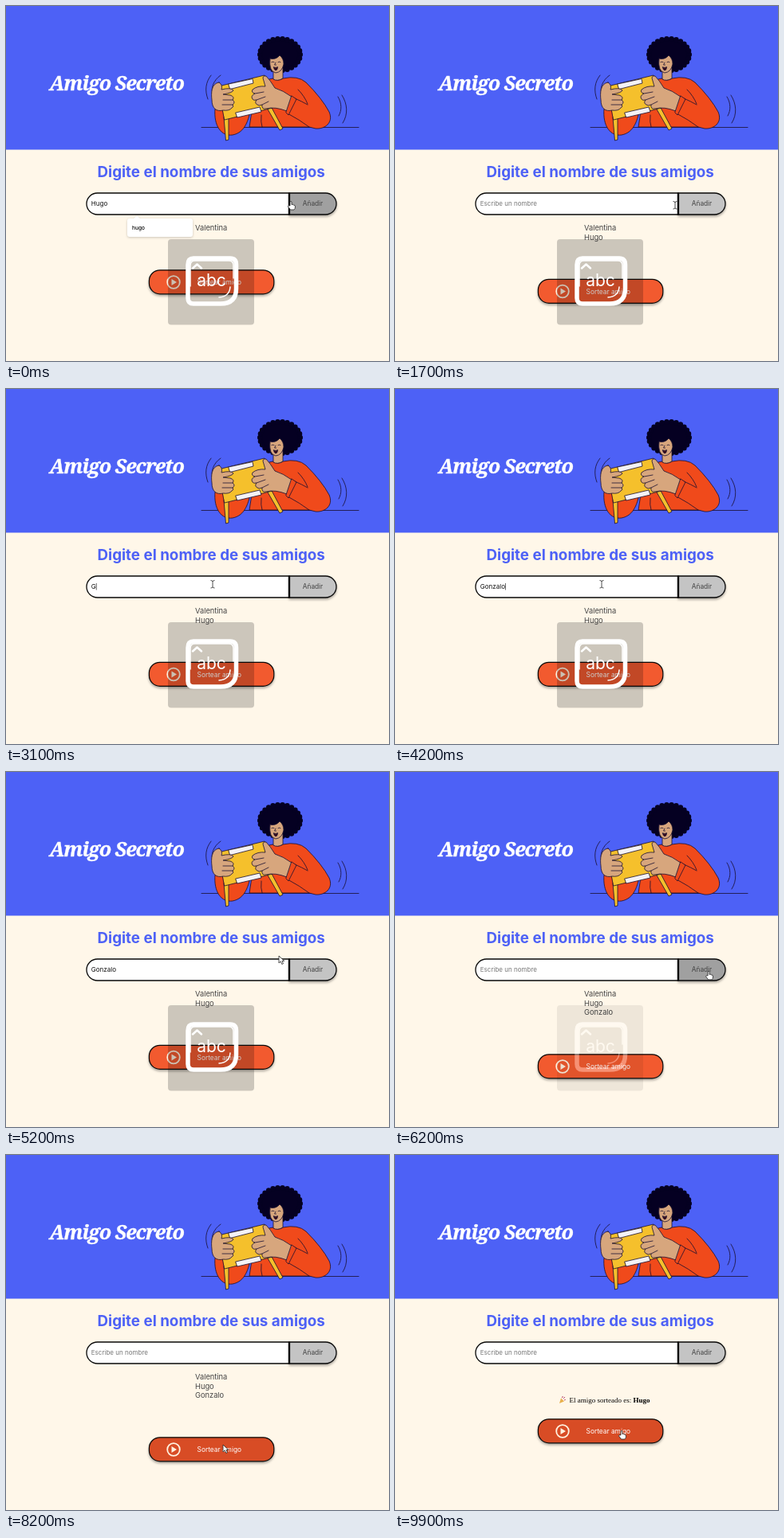
Recreate the animation shown at these times as an HTML page. Size 480 by 446 pixels, loop 10000 ms.

```html
<!DOCTYPE html>
<html lang="es">
<head>
<meta charset="utf-8">
<title>Amigo Secreto</title>
<style>
  html, body { margin: 0; width: 100%; height: 100%; overflow: hidden; background: #fff7e9; }
  svg { display: block; width: 480px; height: 446px; font-family: Inter, sans-serif; }
  .shadow { filter: drop-shadow(.5px 2px 1.5px #0005); }
  .line { fill: none; }
  .art path { stroke: #1a1030; stroke-width: .8; stroke-linejoin: round; stroke-linecap: round; }
  .skin { fill: #d7a67d; }
  .cloth { fill: #f04a1b; }
</style>
</head>
<body>
<svg viewBox="0 0 480 446">
  <rect width="480" height="180.5" fill="#4d61f6"/>
  <text x="54.500" y="106" font-family="Merriweather, 'Noto Serif', serif" font-size="25" font-weight="700" font-style="italic" letter-spacing="-1.050" fill="#fff" stroke="#fff" stroke-width=".4">Amigo Secreto</text>

  <g class="art">
    <path class="line" d="M245 152.5H442M253 117C249 106 250 96 257 87M259 112C256 104 260 93 269 87M417 138C421 131 421 122 416 114M422 147C429 136 428 123 421 112"/>
    <path class="cloth" d="M262 129C260 151 270 164 284 162C300 159 304 143 307 128Z"/>
    <path class="cloth" d="M318 94Q328 93 334 91Q341 95 347 91Q366 87 376 96Q396 116 405 133C411 147 399 155 388 154L380 152H305L309 126Z"/>
    <path class="line" d="M362 116Q371 120 378 124M353 135Q368 143 380 152M366 105Q374 113 378 123M320 137Q319 146 321 152"/>
    <g id="hair" fill="#050022"></g>
    <path class="skin" d="M335 79L335 92Q340 95 347 91L347 78Z"/>
    <path class="skin" d="M331 66Q338 68 343 62Q348 66 348 73Q346 83 338 84Q329 82 331 66Z"/>
    <path class="line" d="M333 70.500q1.500-1 3 0M341 70.500q1.500-1 3 0M338 71l-1.500 3h2"/>
    <path fill="#3a0d1c" d="M335.500 77q3 1 5-.5q0 4-2.500 4.500q-2-.5-2.500-4Z"/>
    <path fill="#f5c02c" d="M273 140L275.500 169L279 168L279 138ZM327 128L343 156L347 154L332 126Z"/>
    <path fill="#f5c02c" d="M266 101L324 87L334 128L274 143Z"/>
    <path fill="#f4f2f5" d="M279 98L309 91.500L310 97L281 104.500ZM288 134L318 127L320 133L290 140Z"/>
    <path class="skin" d="M267 96C257 97 257 110 258 118C258 129 264 133 272 131Q280 132 283 128Q286 127 284 124Q288 121 284 118Q287 114 281 112L272 111Q284 109 285 106Q282 102 270 105Q272 99 267 96Z"/>
    <path class="line" d="M272 118H284M271 124H284"/>
    <path class="skin" d="M358 114Q347 106 337 103Q331 93 326 88Q320 87 323 94L325 101Q315 100 309 105Q307 109 312 110Q306 113 309 117Q310 119 314 118Q311 122 315 124Q317 126 321 124Q320 130 326 129Q337 126 352 132Z"/>
    <path class="line" d="M312 110L323 108M314 118L325 114M321 124L329 120"/>
    <path class="cloth" d="M358 113L364 117L354 137L351 134Z"/>
  </g>

  <text x="257.200" y="214.500" text-anchor="middle" font-size="18.800" font-weight="700" fill="#4d61f6">Digite el nombre de sus amigos</text>

  <g stroke="#080808" stroke-width="1.300">
    <path fill="#fff" d="M355 235H114.500A13.500 13.500 0 0 0 114.500 262H355Z"/>
    <path id="add" class="shadow" d="M355 235H400.500A13.500 13.500 0 0 1 400.500 262H355Z"/>
    <path d="M355 235V262.500" stroke-width="2.300"/>
  </g>
  <text x="384.500" y="251" text-anchor="middle" font-size="8.300" fill="#444">Añadir</text>
  <text id="field" x="106.800" y="251" font-size="8"></text>
  <path id="caret" d="M0 244V252.500" stroke="#222" stroke-width=".7"/>

  <g id="list" font-size="9.300" fill="#444">
    <text x="237" y="282">Valentina</text>
    <text x="237" y="293.500">Hugo</text>
    <text x="237" y="305">Gonzalo</text>
  </g>
  <g id="hint">
    <path class="shadow" style="filter:drop-shadow(0 1px 1.500px #0003)" fill="#fff" d="M155 267H160L164 263.500L168 267H231Q234 267 234 270V287Q234 290 231 290H155Q152 290 152 287V270Q152 267 155 267Z"/>
    <text x="158" y="281" font-size="6.600" font-weight="500">hugo</text>
  </g>
  <g id="result">
    <path d="M206 312L208 305.500L212 309.500Z" fill="#e8b04a"/>
    <path d="M209 305q2-1 1-2M212 308q2-1 2 0M211 306l2-2" fill="none" stroke="#b8496b"/>
    <text x="218.500" y="311" font-family="'Liberation Serif', serif" font-size="9">El amigo sorteado es: <tspan font-weight="700">Hugo</tspan></text>
  </g>

  <g id="draw">
    <rect id="drawBox" class="shadow" x="179.400" y="-.2" width="156.400" height="30" rx="13.500" stroke="#080808" stroke-width="1.200"/>
    <circle cx="210" cy="15" r="7.800" fill="none" stroke="#fff1df" stroke-width="1.800"/>
    <path d="M207.500 11L214 15L207.500 19Z" fill="#fff1df"/>
    <text x="267.300" y="18" text-anchor="middle" font-size="8.350" fill="#fff">Sortear amigo</text>
  </g>

  <g id="keys">
    <rect x="203" y="293" width="108" height="107.500" rx="4" opacity=".2"/>
    <g fill="none" stroke="#fff" stroke-linecap="round" stroke-linejoin="round">
      <path stroke-width="5.500" d="M235 317H281Q288.500 317 288.500 325V355Q288.500 374 269 374H235Q228 374 228 367V325Q228 317 235 317Z"/>
      <path stroke-width="1.500" d="M231 352V326Q231 320 237 320H279Q285 320 285 326V342M281 353Q280 365 267 366"/>
      <path stroke-width="2.500" d="M234 329.500L239.500 324.500L245 329.500"/>
    </g>
    <text x="257.500" y="352" text-anchor="middle" font-size="21" fill="#fff">abc</text>
  </g>

  <g id="cursor" stroke="#222" stroke-width=".8" stroke-linejoin="round">
    <path id="arrow" fill="#fff" d="M0 0V9L2.200 7L3.800 10.500L5.500 9.700L4 6.400H6.800Z"/>
    <path id="beam" fill="none" d="M-2.500-4.500Q0-4.500 0-3Q0-4.500 2.500-4.500M0-3V3.500M-2.500 5Q0 5 0 3.500Q0 5 2.500 5"/>
    <path id="hand" fill="#fff" d="M-1-4Q0-5.500 1-4V-.5Q3-1 3.500 0Q5.500 0 5.500 2Q5.500 5 4 6H-.5L-3.500 2Q-3.500 0-1 1Z"/>
  </g>
</svg>
<script>
const LOOP = 10000, NAME = 'Gonzalo';
const ADD_1 = 600, TYPE = 3000, ADD_2 = 6000, DRAWN = 8500;
const el = Object.fromEntries([...document.querySelectorAll('[id]')].map(e => [e.id, e]));
const clamp = v => Math.max(0, Math.min(1, v));
const show = (e, on) => e.style.display = on ? '' : 'none';

// time, x, y of the pointer
const path = [
  [0, 357, 250], [1200, 357, 250], [1700, 351, 250], [1900, 351, 250], [2500, 259, 245],
  [4500, 259, 245], [5200, 342, 231], [5350, 342, 231], [5750, 390, 251], [6400, 394, 256],
  [7100, 394, 256], [7700, 272, 364], [8700, 272, 364], [9200, 284, 351], [LOOP, 284, 351]
];
// time from which each pointer shape is used
const shapes = [[0, 'hand'], [1400, 'beam'], [4700, 'arrow'], [5500, 'hand'], [7200, 'arrow'], [9000, 'hand']];

let curls = '';
for (let i = 0; i < 26; i++) {
  const a = i * Math.PI / 13;
  curls += `<circle cx="${343.5 + 25.3 * Math.cos(a)}" cy="${61 + 20 * Math.sin(a)}" r="3.200"/>`;
}
el.hair.innerHTML = '<ellipse cx="343.5" cy="61" rx="27" ry="21.5"/>' + curls;

function pointer(t) {
  const i = Math.max(1, path.findIndex(p => p[0] > t));
  const [t0, x0, y0] = path[i - 1], [t1, x1, y1] = path[i];
  const k = clamp((t - t0) / (t1 - t0)), s = k * k * (3 - 2 * k);
  return [x0 + (x1 - x0) * s, y0 + (y1 - y0) * s];
}

function render(t) {
  const [x, y] = pointer(t);
  el.cursor.setAttribute('transform', `translate(${x} ${y})`);
  const shape = shapes.filter(s => s[0] <= t).pop()[1];
  for (const name of ['hand', 'beam', 'arrow']) show(el[name], name === shape);

  let value = '';
  if (t < ADD_1) value = 'Hugo';
  else if (t >= TYPE && t < ADD_2) value = NAME.slice(0, 1 + Math.floor((t - TYPE) / 180));
  el.field.textContent = value || 'Escribe un nombre';
  el.field.setAttribute('fill', value ? '#111' : '#777');
  show(el.caret, t > 2600 && t < 4700 && t % 1000 < 500);
  el.caret.setAttribute('transform', `translate(${value ? 107.3 + el.field.getComputedTextLength() : 107} 0)`);

  const count = t < ADD_1 ? 1 : t < ADD_2 ? 2 : t < DRAWN ? 3 : 0;
  [...el.list.children].forEach((e, i) => show(e, i < count));
  show(el.hint, t < ADD_1);
  show(el.result, t >= DRAWN);

  const top = 332 + Math.max(0, count - 1) * 11.5;
  el.draw.setAttribute('transform', `translate(0 ${top})`);
  const overAdd = x > 355 && y > 235 && y < 262;
  const overDraw = x > 179 && x < 336 && y > top && y < top + 30;
  el.add.setAttribute('fill', overAdd ? '#a0a0a0' : '#c4c4c4');
  el.drawBox.setAttribute('fill', overDraw ? '#d84c25' : '#f25a2f');
  el.keys.setAttribute('opacity', clamp((6500 - t) / 900));
}

function tick(now) {
  render(now % LOOP);
  requestAnimationFrame(tick);
}
requestAnimationFrame(tick);
</script>
</body>
</html>
```
